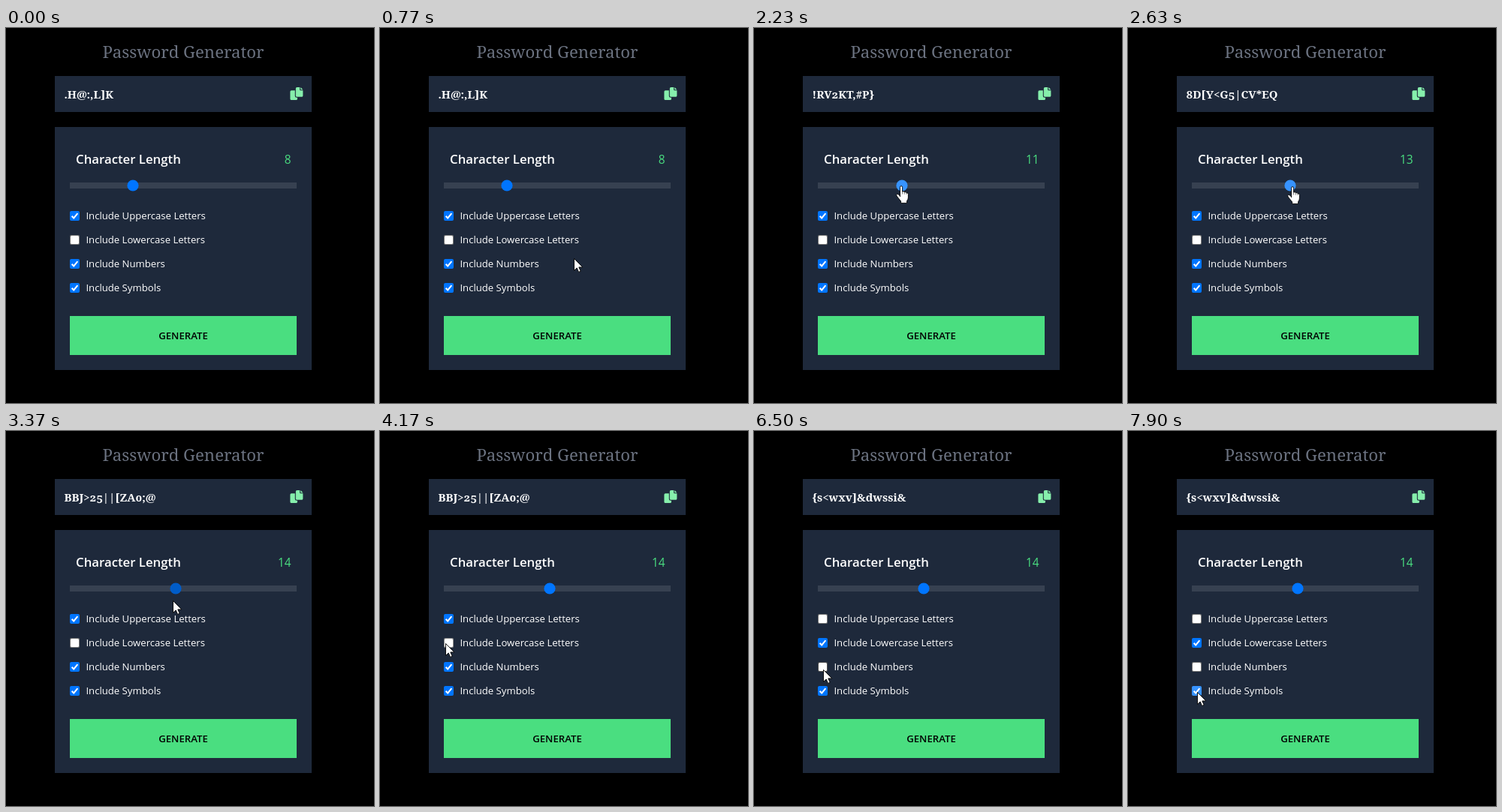
Recreate the animation shown at these times as an HTML page with a canvas. Size 490 by 500 pixels, loop 8000 ms.

```html
<!DOCTYPE html>
<html lang="en">
<head>
<meta charset="utf-8">
<title>Password Generator</title>
<style>
html, body { margin: 0; width: 100%; height: 100%; overflow: hidden; background: #000; }
canvas { display: block; }
#password {
  position: absolute; left: 77.5px; top: 76px; line-height: 24px; white-space: pre;
  font-family: "Noto Serif", Georgia, serif; font-size: 14.8px; font-weight: 600;
  font-variant-numeric: oldstyle-nums; color: #fff;
}
</style>
</head>
<body>
<canvas id="stage" width="490" height="500"></canvas>
<div id="password"></div>
<script>
const ctx = document.getElementById('stage').getContext('2d');
const passwordLine = document.getElementById('password');
const LOOP = 8000;
const SERIF = '"Noto Serif", Georgia, serif';
const SANS = '"Open Sans", "Segoe UI", sans-serif';
const PANEL = '#1e293b', GREEN = '#4ade80';
const BLUE = { idle: '#0075ff', hover: '#005cc8', active: '#3793ff' };
const EDGE = { idle: '#767676', hover: '#4f4f4f', active: '#8d8d8d' };

// Pointer path: time, x, y
const path = [
  [500, 366, 488], [700, 300, 385], [830, 222, 240], [970, 188, 158],
  [1100, 170, 196], [1170, 167, 208], [1500, 167, 208], [2230, 196, 210],
  [2770, 227, 212], [3300, 227, 212], [3370, 222, 226], [3570, 160, 254],
  [3830, 87, 281], [3970, 87, 281], [4030, 87, 283], [4630, 87, 283],
  [5030, 90, 250], [5100, 90, 250], [5170, 90, 249], [5630, 90, 249],
  [5830, 98, 293], [5900, 99, 308], [5970, 92, 318], [7030, 92, 318],
  [7230, 92, 348], [LOOP, 92, 348]
];

const dragPasswords = {
  8: '.H@:,L]K', 9: 'Q;7H]M@2K', 10: 'X4{T&9BZ,W', 11: '!RV2KT,#P}',
  12: 'N#6F:J0}RU+A', 13: '8D[Y<G5|CV*EQ', 14: 'BBJ>25||[ZA0;@'
};
const laterPasswords = [
  [4300, 'Kp4}w#Hz9;fTe2'], [5500, 'm^]^*zbl-}6a3e'], [6300, '{s<wxv]&dwssi&']
];

// Each option: label, right edge, initial state, press time, toggle time
const options = [
  ['Uppercase Letters', 266, true, 5300, 5500],
  ['Lowercase Letters', 265, false, 4170, 4300],
  ['Numbers', 212, true, 6170, 6300],
  ['Symbols', 207, true, 7900, LOOP]
];

function pointerAt(t) {
  const i = Math.max(1, path.findIndex(k => k[0] >= t));
  const [t0, x0, y0] = path[i - 1], [t1, x1, y1] = path[i];
  const p = Math.max(0, (t - t0) / (t1 - t0));
  return { x: Math.round(x0 + (x1 - x0) * p), y: Math.round(y0 + (y1 - y0) * p) };
}

function rect(x, y, w, h, color) {
  ctx.fillStyle = color;
  ctx.fillRect(x, y, w, h);
}

function text(str, x, y, font, color = '#fff', align = 'left') {
  ctx.font = font;
  ctx.fillStyle = color;
  ctx.textAlign = align;
  ctx.fillText(str, x, y);
}

function box(x, y, w, h, r, color) {
  ctx.fillStyle = color;
  ctx.beginPath();
  ctx.roundRect(x, y, w, h, r);
  ctx.fill();
}

// Front page, its folded corner, then the page behind
const copyShape = new Path2D(
  'M12 3V0H8.5Q7 0 7 1.5V10.5Q7 12 8.5 12H14.5Q16 12 16 10.5V4H13Q12 4 12 3Z' +
  'M13 0V3H16Z' +
  'M6 11V4H1.5Q0 4 0 5.5V14.5Q0 16 1.5 16H7.5Q9 16 9 14.5V13H8Q6 13 6 11Z');

function copyIcon() {
  ctx.save();
  ctx.translate(378.4, 79);
  ctx.scale(17 / 16, 17 / 16);
  ctx.fillStyle = '#86efac';
  ctx.fill(copyShape);
  ctx.restore();
}

function checkbox(y, checked, state) {
  if (checked) {
    box(85, y, 13, 13, 2, BLUE[state]);
    ctx.strokeStyle = '#fff';
    ctx.lineWidth = 2;
    ctx.stroke(new Path2D(`M87.6 ${y + 6.8}L90.2 ${y + 9.4}L95.4 ${y + 3.2}`));
  } else {
    box(85, y, 13, 13, 2, EDGE[state]);
    box(86, y + 1, 11, 11, 1.5, '#fff');
  }
}

const arrowShape = new Path2D('M.5 .4V16.4L4.2 12.9L6.6 18.4L9.2 17.3L6.8 11.9H11.8Z');
const handShape = new Path2D('M5.5 15V2.3Q5.5 .6 7 .6Q8.6 .6 8.6 2.3V8Q11 7.2 11.3 8.8Q13.6 8 14 9.8Q16.4 9.3 16.4 11.5V16Q16.4 18.5 14.6 20.5V23.4H6.6V21L1.2 14.2Q0 12.2 1.6 11.5Q3 11 5.5 14Z');
const knuckles = new Path2D('M8.6 8V11.5M11.3 8.8V11.8M14 9.8V12');

function cursor(shape, x, y, isHand) {
  ctx.save();
  ctx.translate(x, y);
  ctx.fillStyle = '#fff';
  ctx.strokeStyle = '#000';
  ctx.lineWidth = .9;
  ctx.fill(shape);
  ctx.stroke(shape);
  if (isHand) {
    ctx.lineWidth = .5;
    ctx.stroke(knuckles);
  }
  ctx.restore();
}

function thumbState(t) {
  if (t >= 1430 && t < 3370) return 'active';
  return (t >= 1100 && t < 1430) || (t >= 3370 && t < 3430) ? 'hover' : 'idle';
}

function draw(t) {
  const mouse = pointerAt(t);
  const visible = t >= 500;
  const dragX = t < 1570 ? 167 : t < 2770 ? mouse.x : 227;
  const length = Math.round((dragX - 93) * 30 / 286);
  const later = laterPasswords.filter(p => t >= p[0]).pop();

  rect(0, 0, 490, 500, '#000');
  text('Password Generator', 236, 40, `22.2px ${SERIF}`, '#6b7280', 'center');

  rect(65, 64, 342, 48, PANEL);
  passwordLine.textContent = later ? later[1] : dragPasswords[length];
  copyIcon();

  rect(65, 132, 342, 324, PANEL);
  text('Character Length', 93, 181, `600 16.8px ${SANS}`);
  text(length, 379.5, 180.5, `15.4px ${SANS}`, GREEN, 'right');

  rect(85, 206, 302, 8, '#374151');
  ctx.fillStyle = BLUE[thumbState(t)];
  ctx.beginPath();
  ctx.arc(Math.floor(93 + length * 286 / 30), 210, 7.6, 0, Math.PI * 2);
  ctx.fill();

  options.forEach(([label, right, initial, press, toggle], i) => {
    const mid = 250 + i * 32;
    const over = visible && mouse.x >= 85 && mouse.x <= right && Math.abs(mouse.y - mid) < 11;
    const state = t >= press && t < toggle ? 'active' : over ? 'hover' : 'idle';
    checkbox(mid - 6, t >= toggle ? !initial : initial, state);
    text('Include ' + label, 106.4, mid + 5, `500 13.15px ${SANS}`);
  });

  rect(85, 384, 302, 52, GREEN);
  text('GENERATE', 236, 415, `600 13.2px ${SANS}`, '#000', 'center');

  if (!visible) return;
  const onButton = mouse.y >= 384 && mouse.y < 436;
  if (onButton || (t >= 1100 && t < 2970)) cursor(handShape, mouse.x - 7, mouse.y, true);
  else cursor(arrowShape, mouse.x, mouse.y, false);
}

// The screen refreshes 15 times a second, on 10 ms marks
function frame(now) {
  const step = Math.floor((now % LOOP + 4) * .015 + .5);
  draw(Math.max(0, Math.round((step - .5) / .15) * 10));
  requestAnimationFrame(frame);
}
requestAnimationFrame(frame);
</script>
</body>
</html>
```
